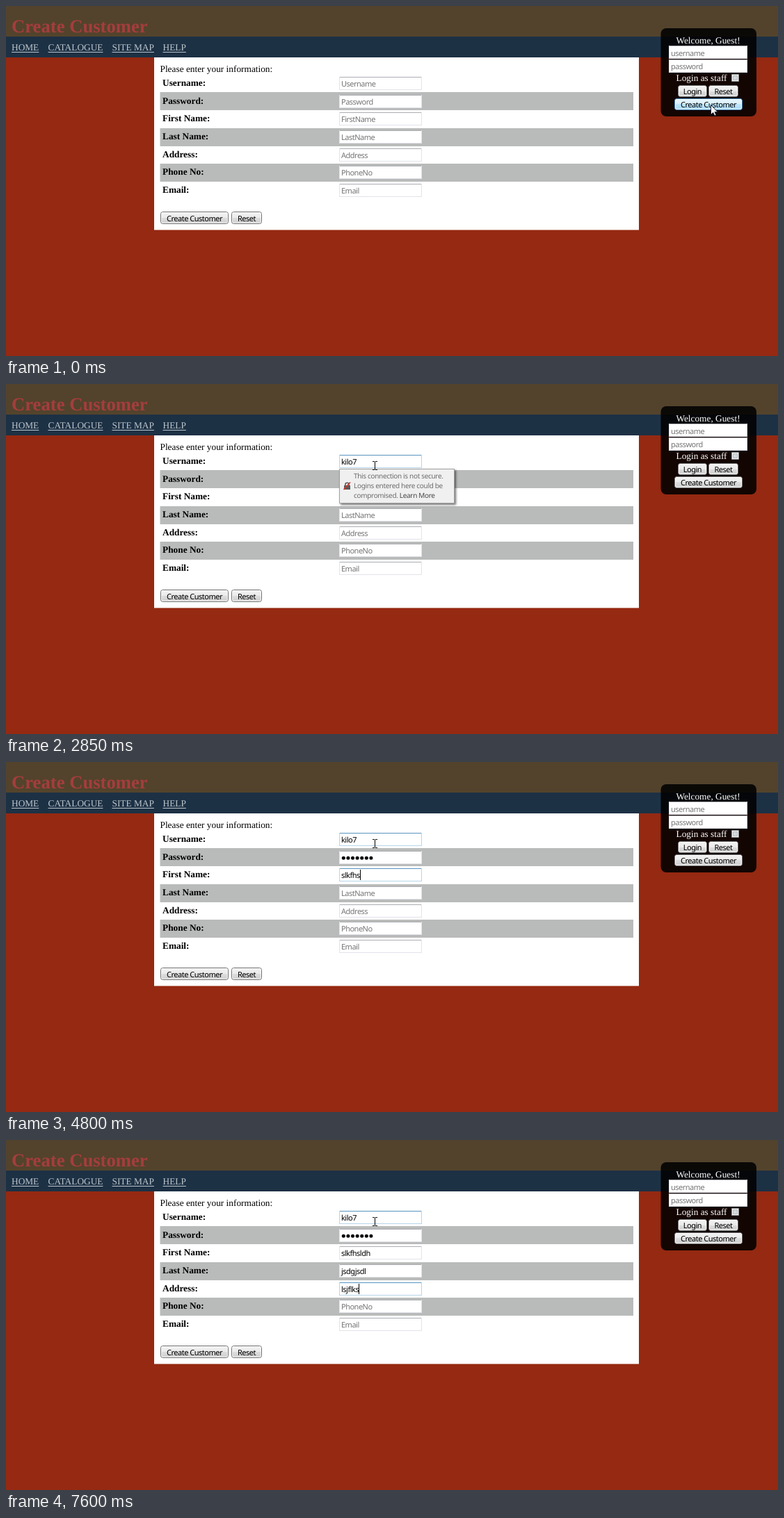
An HTML page with a canvas for the animation above (7990 ms loop, 1110 by 504 pixels).

```html
<!DOCTYPE html>
<html lang="en">
<head>
<meta charset="utf-8">
<title>Create Customer</title>
<style>
html, body { margin: 0; width: 100%; height: 100%; overflow: hidden; background: #952911; }
canvas { display: block; }
</style>
</head>
<body>
<canvas id="stage" width="1110" height="504"></canvas>
<script>
const ctx = document.getElementById('stage').getContext('2d');
const LOOP = 7990;
const SERIF = '13.333px "Liberation Serif", "Times New Roman", serif';
const SANS = '"Noto Sans", "Open Sans", sans-serif';
const ROWS = [
  ['Username:', 'Username'], ['Password:', 'Password'], ['First Name:', 'FirstName'],
  ['Last Name:', 'LastName'], ['Address:', 'Address'], ['Phone No:', 'PhoneNo'], ['Email:', 'Email']
];
const PITCH = 25.67;

// [time, focused row, value, caret shown]
const EVENTS = [
  [1280, 0, '', 1], [1750, 0, '', 0], [2070, 0, 'k', 1], [2150, 0, 'ki', 1],
  [2300, 0, 'kil', 1], [2400, 0, 'kilo', 1], [2610, 0, 'kilo7', 1], [2850, 0, 'kilo7', 0],
  [3010, 1, '', 1], [3480, 1, '**', 1], [3630, 1, '****', 1], [3700, 1, '*****', 1],
  [3780, 1, '*******', 1], [4090, 1, '*******', 0],
  [4270, 2, '', 1], [4560, 2, 'sl', 1], [4650, 2, 'slkf', 1], [4800, 2, 'slkfhs', 1], [4900, 2, 'slkfhsldh', 1],
  [5120, 3, '', 1], [5580, 3, 'j', 1], [5680, 3, 'jsd', 1], [5770, 3, 'jsdg', 1],
  [5840, 3, 'jsdgjs', 1], [5910, 3, 'jsdgjsdl', 1], [6220, 3, 'jsdgjsdl', 0],
  [6530, 4, '', 1], [6770, 4, 'l', 1], [6910, 4, 'lsjf', 1], [7000, 4, 'lsjflks', 1],
  [7140, 4, 'lsjflks', 0], [7600, 4, 'lsjflks', 1]
];

function rect(x, y, w, h, color) {
  ctx.fillStyle = color;
  ctx.fillRect(x, y, w, h);
}

function round(x, y, w, h, r, fill, stroke) {
  ctx.beginPath();
  ctx.roundRect(x, y, w, h, r);
  if (fill) { ctx.fillStyle = fill; ctx.fill(); }
  if (stroke) { ctx.strokeStyle = stroke; ctx.lineWidth = 1; ctx.stroke(); }
}

function text(str, x, y, color, font = SERIF, spacing = 0, align = 'left') {
  ctx.font = font;
  ctx.letterSpacing = spacing + 'px';
  ctx.textRendering = 'geometricPrecision';
  ctx.textAlign = align;
  ctx.fillStyle = color;
  ctx.fillText(str, x, y);
  return ctx.measureText(str).width;
}

const ui = (str, x, y, color, align) => text(str, x, y, color, '11px ' + SANS, -0.5, align);

function link(str, x) {
  const w = text(str, x, 64, '#bcc5cc');
  rect(x, 66, w, 1, '#bcc5cc');
}

function input(x, y, w, h, active) {
  rect(x, y, w, h, active ? '#b7d5ea' : '#e2e3ea');
  rect(x + 1, y + 1, w - 2, h - 2, '#fff');
  rect(x + 1, y, w - 2, 1, active ? '#5794bf' : '#abadb3');
}

function button(label, x, y, w, h, hot) {
  const g = ctx.createLinearGradient(0, y, 0, y + h);
  const stops = hot ? ['#eaf6fd', '#d9f0fc', '#bee6fd', '#a7d9f5'] : ['#f2f2f2', '#ebebeb', '#dddddd', '#cfcfcf'];
  [0, 0.5, 0.5, 1].forEach((p, i) => g.addColorStop(p, stops[i]));
  round(x + 0.5, y + 0.5, w - 1, h - 1, 3, g, hot ? '#3c7fb1' : '#707070');
  round(x + 1.5, y + 1.5, w - 3, h - 3, 2, null, 'rgba(255,255,255,0.75)');
  ui(label, x + w / 2, y + h / 2 + 4.5, '#000', 'center');
}

function page() {
  rect(0, 0, 1110, 504, '#952911');
  rect(0, 0, 1110, 44, '#53432c');
  rect(0, 44, 1110, 30, '#1d3145');
  text('Create Customer', 8, 38, '#a53d3d', 'bold 26.667px "Liberation Serif", "Times New Roman", serif');
  link('HOME', 8);
  link('CATALOGUE', 60.5);
  link('SITE MAP', 152.5);
  link('HELP', 225.5);
  rect(213, 74, 697, 248.5, '#fff');
  text('Please enter your information:', 221.5, 95, '#000');
}

function loginPanel(hot) {
  round(941.5, 32, 137.5, 127, 8, 'rgba(0,0,0,0.87)');
  text('Welcome, Guest!', 1009.5, 54, '#fff', SERIF, 0, 'center');
  input(953, 57, 113, 19);
  input(953, 77, 113, 19);
  ui('username', 956, 72, '#757575');
  ui('password', 956, 91, '#757575');
  text('Login as staff', 963.5, 108, '#fff');
  round(1043.5, 98.5, 10, 10, 0, '#f4f4f4', '#8e8f8f');
  round(1045.5, 100.5, 6, 6, 0, '#d5d9dd', '#b9bdc2');
  button('Login', 966, 114, 42, 17);
  button('Reset', 1010, 114, 43, 17);
  button('Create Customer', 961, 133, 98, 17, hot);
}

function field(i, value, focused, hovered, caret) {
  const y = Math.round(102 + PITCH * i);
  const base = Math.round(116 + PITCH * i);
  if (i % 2) rect(221.5, Math.round(124.3 + PITCH * (i - 1)), 680.5, 26, '#b9bbba');
  text(ROWS[i][0], 225, Math.round(115 + PITCH * i), '#000', 'bold ' + SERIF);
  input(479, y, 119, 19, focused || hovered);
  let w = 0;
  if (!value) {
    ui(ROWS[i][1], 482, base, '#757575');
  } else if (i === 1) {
    w = value.length * 6.6;
    ctx.fillStyle = '#000';
    for (let k = 0; k < value.length; k++) {
      ctx.beginPath();
      ctx.arc(485.3 + k * 6.6, y + 10.3, 2.5, 0, 7);
      ctx.fill();
    }
  } else {
    w = ui(value, 482, base, '#000');
  }
  if (focused && caret) rect(Math.round(482 + w), y + 2, 1, 15, '#000');
}

function warning(y, alpha) {
  ctx.save();
  ctx.globalAlpha = alpha;
  ctx.translate(479, y);
  ctx.shadowColor = 'rgba(0,0,0,0.55)';
  ctx.shadowBlur = 3;
  ctx.shadowOffsetX = ctx.shadowOffsetY = 2;
  rect(0, 0, 166, 50, '#a0a0a0');
  ctx.shadowColor = 'transparent';
  rect(1, 1, 164, 48, '#f0f0f0');
  const line = (s, x, b, c) => text(s, x, b, c, '10px ' + SANS, -0.33);
  line('This connection is not secure.', 21, 14, '#6b6b6b');
  line('Logins entered here could be', 21, 28, '#6b6b6b');
  const w = line('compromised. ', 21, 42, '#6b6b6b');
  line('Learn More', 21 + w, 42, '#454545');
  // struck-out padlock
  rect(7, 24, 9, 6, '#5a5a5a');
  ctx.beginPath();
  ctx.arc(11.5, 23, 2.7, Math.PI, 0);
  ctx.lineTo(14.2, 25);
  ctx.moveTo(8.8, 23);
  ctx.lineTo(8.8, 25);
  ctx.strokeStyle = '#5a5a5a';
  ctx.lineWidth = 1.5;
  ctx.stroke();
  ctx.beginPath();
  ctx.moveTo(6.5, 30);
  ctx.lineTo(16, 19.5);
  ctx.strokeStyle = '#d9342b';
  ctx.lineWidth = 1.6;
  ctx.stroke();
  ctx.restore();
}

function arrow(x, y) {
  ctx.beginPath();
  [[0, 0], [0, 14], [3.2, 11], [5.4, 15.6], [7.6, 14.6], [5.5, 10.2], [9.8, 10.2]]
    .forEach(([dx, dy]) => ctx.lineTo(x + 0.5 + dx, y + 0.5 + dy));
  ctx.closePath();
  ctx.fillStyle = '#fff';
  ctx.fill();
  ctx.strokeStyle = '#1a1a2a';
  ctx.lineWidth = 1;
  ctx.stroke();
}

function beam(x, y) {
  rect(x, y - 5, 1, 11, '#000');
  for (const dy of [-6, 6]) {
    rect(x - 3, y + dy, 3, 1, '#000');
    rect(x + 1, y + dy, 3, 1, '#000');
  }
}

function pointer(t) {
  const steps = t < 500 ? 0 : Math.min(11, Math.floor((t - 500) / 78 + 0.001) + 1);
  const p = 1 - Math.pow(1 - steps / 11, 2.15);
  return { x: Math.round(1013 - 483 * p), y: Math.round(142 - 25 * Math.pow(p, 1.6)) };
}

function draw(t) {
  const values = [];
  let focus = -1, caret = 0;
  for (const [at, row, value, on] of EVENTS) {
    if (t < at) break;
    values[row] = value;
    focus = row;
    caret = on;
  }
  const { x, y } = pointer(t);
  const overInput = x < 598 && y < 121;

  page();
  ROWS.forEach((_, i) => field(i, values[i], i === focus, i === 0 && overInput, caret));
  button('Create Customer', 222, 296, 98, 18);
  button('Reset', 324, 296, 44, 18);
  loginPanel(x > 961);
  if (t >= 1380 && t < 3010) warning(122, 1);
  if (t >= 3095 && t < 4270) warning(148, t < 3180 ? 0.5 : 1);
  (overInput ? beam : arrow)(x, y);
}

const start = performance.now();
function tick() {
  draw((performance.now() - start) % LOOP);
  requestAnimationFrame(tick);
}
tick();
</script>
</body>
</html>
```
